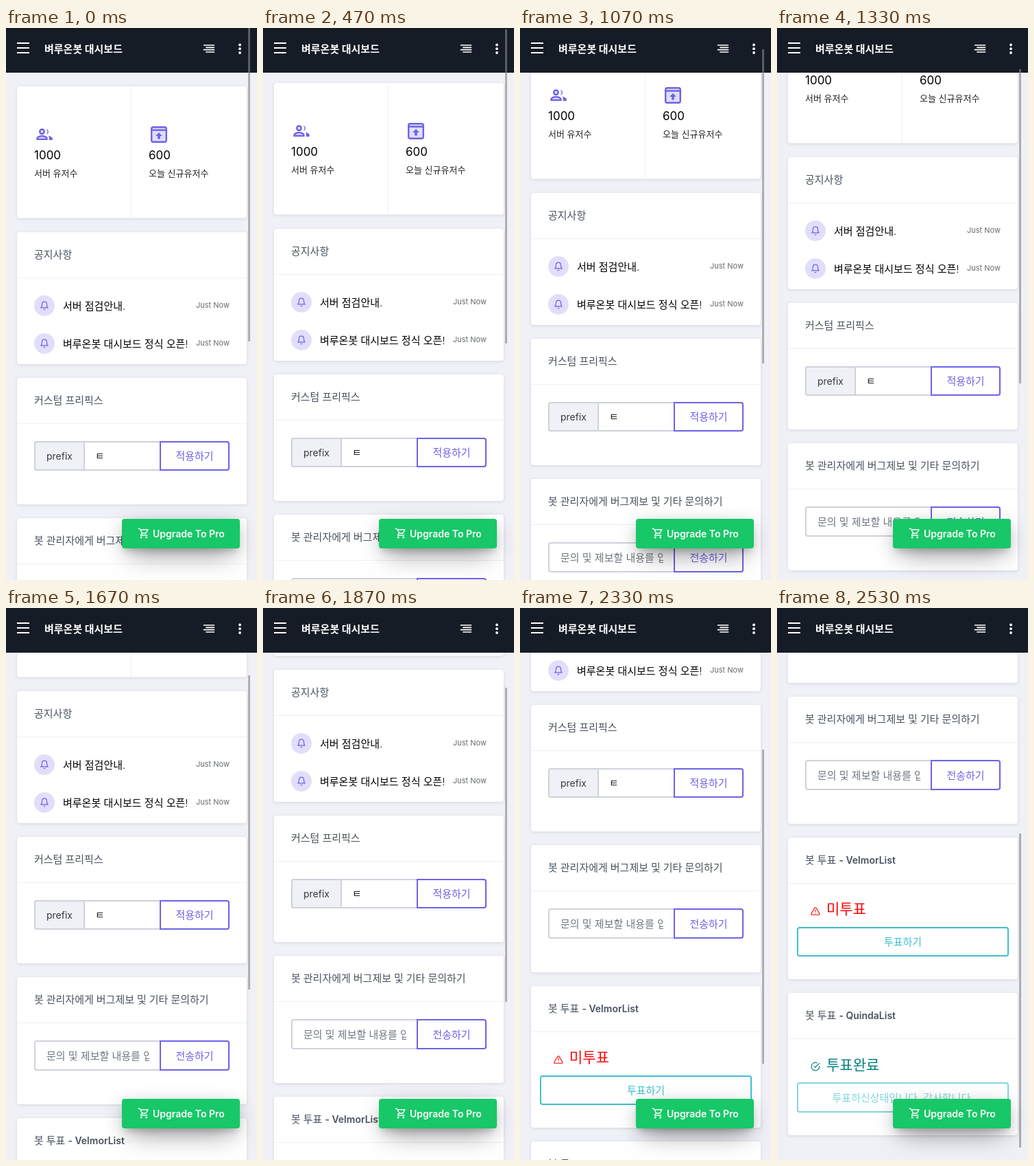
Write an HTML page that moves like this. It is 366 px wide and 803 px high and loops after 2590 ms.

```html
<!DOCTYPE html>
<html lang="ko">
<head>
<meta charset="utf-8">
<title>대시보드</title>
<style>
  html, body { margin: 0; width: 100%; height: 100%; overflow: hidden; background: #f0f1f7; }
  svg { display: block; }
  text { font: 300 15px Inter, "Noto Sans CJK KR", "Noto Sans CJK", sans-serif; white-space: pre; }
  .heading { font-weight: 700; fill: #fff; }
  .title { font-weight: 500; fill: #48525f; }
  .latin { font-size: 14px; font-weight: 600; }
  .prefix { font-size: 14px; font-weight: 400; }
  .count { font-size: 17px; font-weight: 400; }
  .label { font-size: 13px; fill: #222; }
  .time { font-size: 11px; font-weight: 400; fill: #666b73; text-anchor: end; }
  .center { text-anchor: middle; }
  .status { font-size: 21px; }
  .card { fill: #fff; filter: drop-shadow(0 1px 2px rgba(20, 25, 50, .13)); }
  .rule { stroke: #eef0f3; }
  .field { fill: #fff; stroke: #cfd2da; stroke-width: 2; }
  .button { fill: #fff; stroke-width: 2; }
  .line { fill: none; stroke-linecap: round; stroke-linejoin: round; }
  #upgrade {
    position: absolute; left: 169px; top: 714px; width: 172px; height: 43px;
    border-radius: 4px; background: #18c768;
    box-shadow: 0 16px 38px -12px rgba(0, 0, 0, .56), 0 4px 25px rgba(0, 0, 0, .12), 0 8px 10px -5px rgba(0, 0, 0, .2);
  }
</style>
</head>
<body>
<svg width="366" height="803" viewBox="0 0 366 803">
  <rect width="366" height="803" fill="#f0f1f7"/>
  <g id="page"></g>
  <g id="header"></g>
  <rect id="thumb" x="353" width="3" height="457" fill="#878787" fill-opacity=".62"/>
</svg>
<div id="upgrade">
  <svg width="172" height="43">
    <g class="line" stroke="#fff" stroke-width="1.9" transform="translate(23 12) scale(.75)">
      <path d="M1 3h3l5 9h7l4-7H5.5M8 12l-2 4h13" stroke-linecap="butt"/>
      <g fill="#fff" stroke="none"><circle cx="7" cy="20" r="2"/><circle cx="17" cy="20" r="2"/></g>
    </g>
    <text class="latin" x="45" y="27" fill="#fff">Upgrade To Pro</text>
  </svg>
</div>
<script>
const PURPLE = '#6e62e6', LILAC = '#e1defb', CYAN = '#3fc0cf';
const LOOP = 2590, FPS = 15;

const text = (x, y, content, cls = '', fill = '') =>
  `<text x="${x}" y="${y}" class="${cls}" ${fill && `style="fill:${fill}"`}>${content}</text>`;

const card = (y, height) => `<rect class="card" x="16" y="${y}" width="335" height="${height}" rx="4"/>`;

const titledCard = (y, height, title) => card(y, height) +
  text(41, y + 37.5, title, 'title') +
  `<path class="rule" d="M16 ${y + 66.5}h335"/>`;

const button = (y, height, label, opacity = 1) => `<g opacity="${opacity}">
  <rect class="button" x="30" y="${y + 1}" width="307" height="${height - 2}" rx="3" stroke="${CYAN}"/>
  ${text(183.5, y + height / 2 + 5.5, label, 'center', CYAN)}</g>`;

// Text field with an attached button, square where the two meet.
const field = (y, height, label, content) => `
  <rect class="field" x="42" y="${y + 1}" width="283" height="${height - 2}" rx="3"/>${content}
  <path class="button" stroke="${PURPLE}" d="M225 ${y + 1}h97q3 0 3 3v${height - 8}q0 3-3 3h-97z"/>
  ${text(275, y + height / 2 + 5.5, label, 'center', PURPLE)}`;

const icon = (cx, cy, size, color, d, width = 2) => `<path class="line" d="${d}" stroke="${color}"
  stroke-width="${width}" transform="translate(${cx - size / 2} ${cy - size / 2}) scale(${size / 24})"/>`;

const ALIGN_RIGHT = 'M3 6h18M7 10h14M3 14h18M7 18h14';
const BELL = 'M18 8A6 6 0 0 0 6 8c0 7-3 9-3 9h18s-3-2-3-9M13.7 21a2 2 0 0 1-3.4 0';
const WARNING = 'M10.3 3.9 1.8 18a2 2 0 0 0 1.7 3h17a2 2 0 0 0 1.7-3L13.7 3.9a2 2 0 0 0-3.4 0zM12 9v4M12 17v.1';
const CHECK = 'M22 11v1a10 10 0 1 1-6-9.1M22 4 12 14l-3-3';

const notice = (y, content) => `<circle cx="56" cy="${y}" r="15" fill="${LILAC}"/>` +
  icon(56, y, 14, PURPLE, BELL) +
  text(83, y + 5.5, content) + text(326, y + 3, 'Just Now', 'time');

const peopleIcon = `<g transform="translate(42 140.8) scale(1.17)" stroke="${PURPLE}" stroke-width="2" fill="${LILAC}">
  <circle cx="9" cy="8.5" r="2.8"/>
  <path d="M3 18v-1c0-1.8 3.5-3 6-3s6 1.2 6 3v1z"/>
  <path d="M14.5 5a3.7 3.7 0 0 1 0 7 6 6 0 0 0 0-7zM17 13.7c2.4.5 5 1.6 5 3.4V19h-4v-2c0-1.3-.4-2.4-1-3.3z" fill="${PURPLE}" stroke="none"/></g>`;

const boxIcon = `<rect x="212.2" y="144.2" width="21.6" height="21.6" rx="2.5" fill="${LILAC}" stroke="${PURPLE}" stroke-width="2.4"/>
  <path d="M212 148.5h22" stroke="${PURPLE}" stroke-width="2.4"/>
  <path d="M223 152l5 5h-3.2v4.5h-3.6V157H218z" fill="${PURPLE}"/>`;

const voteCard = (y, height, site) => titledCard(y, height, `봇 투표 <tspan class="latin">- ${site}</tspan>`);

document.getElementById('header').innerHTML = [
  '<rect width="366" height="65" fill="#161c25"/>',
  '<path d="M16 22h18M16 29h18M16 36h18" stroke="#fff" stroke-width="2"/>',
  text(56, 35.5, '벼루온봇 대시보드', 'heading'),
  icon(296, 30, 20, '#fff', ALIGN_RIGHT),
  ...[24.5, 30.2, 36].map(y => `<circle cx="341" cy="${y}" r="1.9" fill="#fff"/>`),
].join('');

const page = document.getElementById('page');
page.innerHTML = [
  card(85, 191.5), '<path class="rule" d="M182.5 85v191"/>',
  peopleIcon, text(41, 191, '1000', 'count'), text(41, 216, '서버 유저수', 'label'),
  boxIcon, text(208, 191, '600', 'count'), text(208, 216, '오늘 신규유저수', 'label'),

  titledCard(297, 192, '공지사항'),
  notice(404, '서버 점검안내.'), notice(459, '벼루온봇 대시보드 정식 오픈!'),

  titledCard(509, 184, '커스텀 프리픽스'),
  field(601, 43, '적용하기',
    '<path d="M114 602H45q-3 0-3 3v35q0 3 3 3h69z" fill="#f0f1f7" stroke="#cfd2da" stroke-width="2"/>' +
    text(59, 628, 'prefix', 'prefix', '#343a42') + text(130, 628, 'ㅌ', '', '#222')),

  titledCard(713, 185, '봇 관리자에게 버그제보 및 기타 문의하기'),
  '<clipPath id="entry"><rect x="59" y="806" width="150" height="42"/></clipPath>',
  field(805, 44, '전송하기',
    `<g clip-path="url(#entry)">${text(59, 832.5, '문의 및 제보할 내용를 입력해주세요.', '', '#6d7783')}</g>`),

  voteCard(918, 206, 'VelmorList'),
  icon(56, 1025, 14, '#f00', WARNING), text(72, 1029, '미투표', 'status', '#f00'),
  button(1048, 43, '투표하기'),

  voteCard(1144, 207, 'QuindaList'),
  icon(56, 1251, 14, '#008080', CHECK), text(72, 1255.5, '투표완료', 'status', '#008080'),
  button(1274, 44, '투표하신상태입니다. 감사합니다.', .65),
].join('');

// Scroll gesture: [step, offset], joined by a monotone cubic.
const KEYS = [[0, 0], [6, 0], [7, 5], [12, 35], [14, 41], [20, 109], [25, 176], [31, 228], [32, 231], [38, 584]];
const slopes = KEYS.slice(1).map(([x, y], i) => (y - KEYS[i][1]) / (x - KEYS[i][0]));
const tangents = KEYS.map((_, i) => {
  const a = slopes[i - 1] ?? slopes[i], b = slopes[i] ?? a;
  return a * b > 0 ? 2 * a * b / (a + b) : 0;
});

function scrollAt(step) {
  const i = Math.max(0, KEYS.findIndex(([x]) => x >= step) - 1);
  const [x0, y0] = KEYS[i], [x1, y1] = KEYS[i + 1];
  const span = x1 - x0, u = (step - x0) / span, v = 1 - u;
  return y0 * v * v * (1 + 2 * u) + y1 * u * u * (3 - 2 * u) +
    span * u * v * (tangents[i] * v - tangents[i + 1] * u);
}

const thumb = document.getElementById('thumb');
function draw(now) {
  const step = Math.min(38, Math.floor((now % LOOP + 4) * FPS / 1000));
  const offset = Math.round(scrollAt(step));
  page.setAttribute('transform', `translate(0 ${-offset})`);
  thumb.setAttribute('y', Math.round(offset * .563 - 1));
}

let start;
function tick(now) {
  start ??= now;
  draw(now - start);
  requestAnimationFrame(tick);
}
draw(0);
requestAnimationFrame(tick);
</script>
</body>
</html>
```
